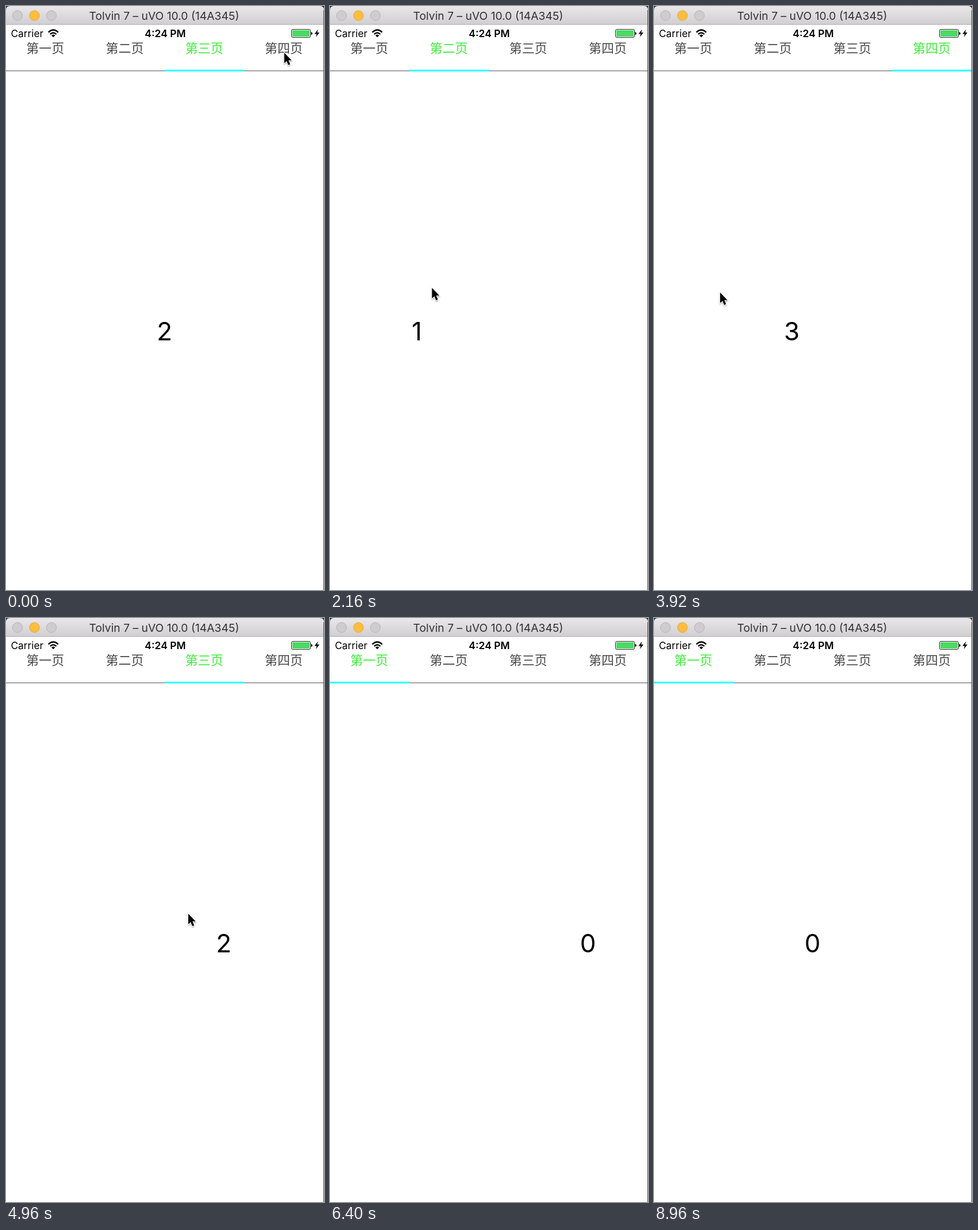
An HTML page for the animation above (9040 ms loop, 553 px wide and 1013 px high).

```html
<!DOCTYPE html>
<html lang="zh-CN">
<head>
<meta charset="utf-8">
<title>Paged tabs</title>
<style>
html, body { margin: 0; width: 100%; height: 100%; overflow: hidden; background: #fff; }
svg { display: block; width: 553px; height: 1013px; font-family: Inter, Roboto, sans-serif; text-anchor: middle; }
#tabs { font: 22px "Noto Sans CJK SC", "Noto Sans CJK", sans-serif; }
#digits { font-size: 44px; }
</style>
</head>
<body>
<svg viewBox="0 0 553 1013">
  <defs>
    <linearGradient id="bar" x2="0" y2="1">
      <stop offset="0" stop-color="#e9e7e9"/>
      <stop offset="1" stop-color="#d0ced0"/>
    </linearGradient>
    <filter id="shade" x="-50%" y="-50%" width="200%" height="200%">
      <feDropShadow dx="0" dy="1.5" stdDeviation="1.2" flood-opacity=".4"/>
    </filter>
  </defs>
  <rect width="553" height="1013" fill="#fff"/>
  <g id="digits"></g>

  <rect width="553" height="20" fill="#1d3940"/>
  <path d="M0 32.5V7Q0 0 7 0H546Q553 0 553 7V32.5Z" fill="url(#bar)"/>
  <path d="M0 32H553" stroke="#b3b1b3"/>
  <g fill="#cfcccf" stroke="#b5b2b5">
    <circle cx="20" cy="16.5" r="8.6"/>
    <circle cx="49.5" cy="16.5" r="8.6" fill="#fdbd3e" stroke="#e3a640"/>
    <circle cx="79" cy="16.5" r="8.6"/>
  </g>
  <text x="275" y="23.5" font-size="19.3" fill="#333133">Tolvin 7 – uVO 10.0 (14A345)</text>

  <text x="8.5" y="54" font-size="17.3" text-anchor="start">Carrier</text>
  <g fill="none" stroke="#000" stroke-width="2.4">
    <path d="M73.6 45.6Q82.2 37.4 90.8 45.6"/>
    <path d="M76.8 49Q82.2 43.8 87.6 49"/>
  </g>
  <path d="M82.2 54.3L78.9 51Q82.2 47.8 85.5 51Z"/>
  <text x="277" y="54" font-size="17.5" font-weight="600">4:24 PM</text>
  <rect x="496.5" y="40.5" width="33" height="14" rx="2.5" fill="#fff" stroke="#222"/>
  <rect x="498" y="42" width="30" height="11" rx="1" fill="#4cd964"/>
  <path d="M530.5 45H531Q532.8 45.5 532.8 47.5T531 50H530.5Z"/>
  <path d="M542.5 40.5L536.5 48.5H540.3L538.8 54L545 46H541.2Z"/>

  <g id="tabs"></g>
  <path d="M0 112.5H553" stroke="#555"/>
  <rect id="mark" y="110.5" width="138.5" height="3" fill="#2bfcfd"/>
  <path d="M552.5 7V1013" stroke="#45565a"/>
  <path id="cursor" d="M0 0V18.2L4.1 14.4 7.1 21.4 10.3 20 7.3 13.2H12.8Z"
    stroke="#fff" stroke-width="1.6" paint-order="stroke" filter="url(#shade)"/>
</svg>
<script>
const LOOP = 9040, STEP = 80, WIDTH = 553, TAB = WIDTH / 4, LAST = 3;
const TAP = 80, DRAG = 240, SETTLE = 320;
const $ = id => document.getElementById(id);
const mix = (a, b, k) => a + (b - a) * k;
const clamp = k => Math.max(0, Math.min(1, k));
const smooth = k => k * k * (3 - 2 * k);
const easeOut = k => 1 - (1 - k) ** 3;

const tap = (at, to, y = 84) => ({ at, to, x: TAB * (to + .5), y, by: 0, end: at + TAP });
const swipe = (at, to, x, by, y = 496) => ({ at, to, x, y, by, end: at + DRAG });

// The pointer travels from each gesture to the next, then leaves at the top
const gestures = [
  tap(160, 3, 80), tap(1040, 0), tap(1440, 1),
  swipe(2000, 2, 302, -187, 488), swipe(2960, 3, 330, -200), swipe(3760, 3, 187, -108),
  swipe(4320, 2, 110, 220, 512), swipe(4880, 1, 214, 309, 512),
  swipe(5600, 0, 180, 220), swipe(6160, 0, 219, 346),
  tap(7280, 3), tap(8080, 0, 94),
  { at: 8560, x: 60, y: -30, by: 0, end: LOOP }
];

function pointer(t) {
  const i = gestures.findIndex(g => g.end > t);
  const g = gestures[i], prev = gestures[i - 1] || g;
  if (t >= g.at) return [g.x + g.by * (t - g.at) / (g.end - g.at), g.y];
  const k = smooth(clamp((t - prev.end) / (g.at - prev.end)));
  return [mix(prev.x + prev.by, g.x, k), mix(prev.y, g.y, k)];
}

// Dragging past either end moves at half speed
function dragged(from, g, t) {
  const pos = from - g.by / WIDTH * clamp((t - g.at) / DRAG);
  return mix(pos, clamp(pos / LAST) * LAST, .5);
}

function pages(t) {
  let pos = 2, tab = 2;
  for (const g of gestures) {
    if (g.to === undefined || t < g.at) break;
    const from = tab;
    if (g.by) {
      const k = clamp((t - g.end) / SETTLE);
      pos = mix(dragged(from, g, t), g.to, easeOut(k));
      if (k === 1) tab = g.to;
    } else {
      pos = mix(from, g.to, smooth(clamp((t - g.at) / SETTLE)));
      tab = g.to;
    }
  }
  return { pos, tab };
}

function label(parent, text, x, y) {
  const el = document.createElementNS(parent.namespaceURI, "text");
  el.textContent = text;
  el.setAttribute("x", x);
  el.setAttribute("y", y);
  return parent.appendChild(el);
}

const tabs = [..."一二三四"].map((n, i) => label($("tabs"), `第${n}页`, TAB * (i + .5) - .8, 81));
for (let i = 0; i <= LAST; i++) label($("digits"), i, WIDTH * i + 275.7, 580);

function draw(t) {
  const { pos, tab } = pages(t), [x, y] = pointer(t);
  $("digits").setAttribute("transform", `translate(${-pos * WIDTH} 0)`);
  $("mark").setAttribute("x", Math.floor(tab * TAB));
  $("cursor").setAttribute("transform", `translate(${x} ${y + 1})`);
  tabs.forEach((el, i) => el.setAttribute("fill", i === tab ? "#3fee3b" : "#4a4a4a"));
}

const begin = performance.now();
function tick() {
  const t = (performance.now() - begin) % LOOP;
  draw(Math.floor(t / STEP) * STEP);
  requestAnimationFrame(tick);
}
tick();
</script>
</body>
</html>
```
